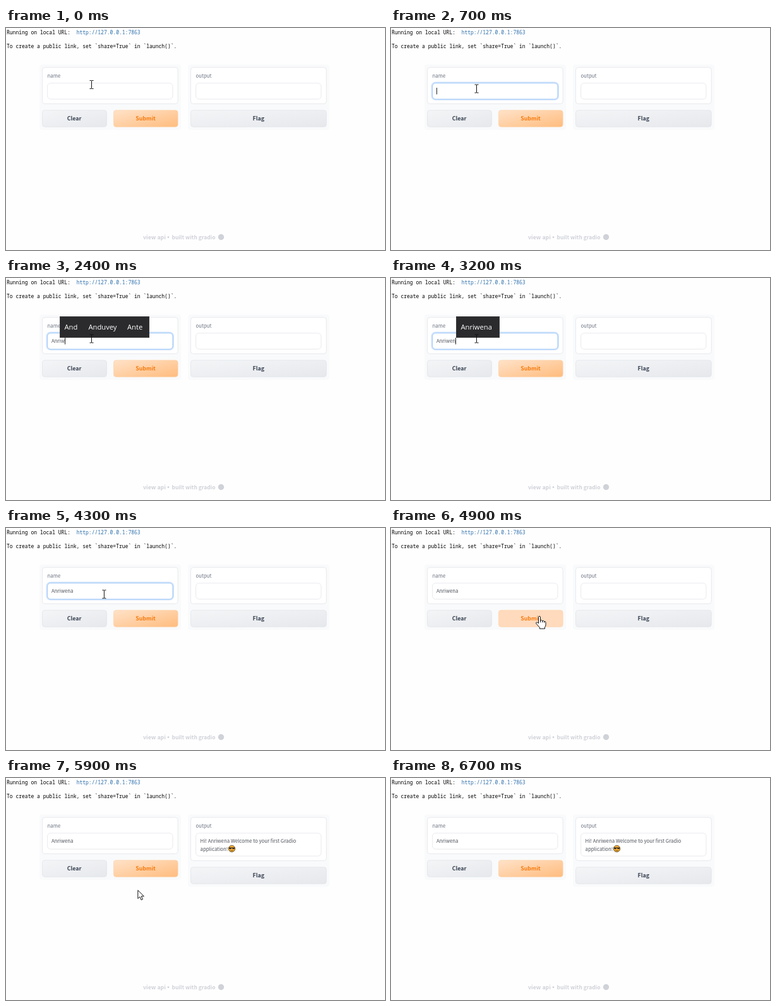
An HTML page for the animation above (7 s loop, 600x353 px).

```html
<!DOCTYPE html>
<html lang="en">
<head>
<meta charset="utf-8">
<title>Interface demo</title>
<style>
  html, body { margin: 0; width: 100%; height: 100%; overflow: hidden; background: #fffeff; }
  svg { display: block; width: 100%; height: 100%; }
  text { white-space: pre; }
  .mono { font: 8.02px "Noto Sans Mono", "DejaVu Sans Mono", monospace; }
  .ui { font: 7.84px "Noto Sans CJK JP", "Noto Sans CJK SC", "Noto Sans CJK", Lato, sans-serif; fill: #4f535b; }
  .label { fill: #6b7280; }
  .btn { font-size: 8.8px; font-weight: 700; text-anchor: middle; fill: #374151; }
  .foot { font-size: 8.8px; font-weight: 700; fill: #cfd2d8; }
  .tip { font: 11.2px "Open Sans", "Noto Sans", sans-serif; fill: #fff; }
  .panel { fill: #f9fafb; }
  .card, .field { fill: #fff; stroke: #e4e5ea; stroke-width: .8; }
  .key { fill: url(#grey); stroke: #e0e3e7; stroke-width: .7; }
</style>
</head>
<body>
<svg viewBox="0 0 600 353" xmlns="http://www.w3.org/2000/svg">
  <defs>
    <linearGradient id="grey" x1="0" y1="0" x2="1" y2="1">
      <stop stop-color="#f4f5f7"/><stop offset="1" stop-color="#e6e8ec"/>
    </linearGradient>
    <linearGradient id="warm" x1="0" y1="0" x2="1" y2="1">
      <stop stop-color="#ffe2c8"/><stop offset="1" stop-color="#ffbc7e"/>
    </linearGradient>
  </defs>

  <text class="mono" x="1" y="10">Running on local URL:  <tspan fill="#296eaa">http://127.0.0.1:7863</tspan></text>
  <text class="mono" x="1" y="31.5">To create a public link, set `share=True` in `launch()`.</text>

  <rect class="panel" x="53" y="58" width="224" height="104" rx="4"/>
  <rect class="card" x="57.5" y="62.7" width="214.7" height="57.8" rx="4"/>
  <text class="ui label" x="65.5" y="79">name</text>
  <rect id="ring" x="65" y="87" width="199.5" height="26.6" rx="5.5" fill="none" stroke="#cfe3fc" stroke-width="3"/>
  <rect id="field" class="field" x="65.6" y="87.7" width="198.3" height="25.4" rx="5"/>
  <text id="typed" class="ui" x="72" y="103.4"></text>
  <rect id="caret" y="95" width="1" height="10.5" fill="#222"/>
  <rect class="key" x="57.5" y="130.8" width="101.9" height="26.4" rx="4"/>
  <text class="ui btn" x="108" y="147.2">Clear</text>
  <rect id="submit" x="170.4" y="130.8" width="101.7" height="26.4" rx="4" stroke="#fdcfa2" stroke-width=".6"/>
  <text class="ui btn" x="221" y="147.2" style="fill:#f57c10">Submit</text>

  <rect id="panel" class="panel" x="288" y="58" width="224" rx="4"/>
  <rect id="card" class="card" x="292.5" y="62.7" width="214.7" rx="4"/>
  <text class="ui label" x="300.5" y="79">output</text>
  <rect id="out" class="field" x="300.6" y="87.7" width="198.3" rx="5"/>
  <g id="reply">
    <text class="ui" x="307.5" y="103.4">Hi! Anriwena Welcome to your first Gradio</text>
    <text class="ui" x="307.5" y="115.8">application!</text>
    <g transform="translate(357.5 112.4)">
      <circle r="5.2" fill="#f3ae35" stroke="#4a3418" stroke-width=".8"/>
      <path d="M-4.6 -2H4.6V-.9Q4.2 .7 2.5 .7T.5 -1H-.5Q-.8 .7 -2.5 .7T-4.6 -.9Z" fill="#2b2520"/>
      <path d="M-2.3 2.5Q0 3.9 2.3 2.5" fill="none" stroke="#5a3a14" stroke-width=".8"/>
    </g>
  </g>
  <g id="flag">
    <rect class="key" x="292.5" y="130.8" width="214.7" height="26.4" rx="4"/>
    <text class="ui btn" x="399.8" y="147.2">Flag</text>
  </g>

  <text class="ui foot" x="217" y="335.5">view api</text>
  <circle cx="257" cy="332.7" r="1.4" fill="#cfd2d8"/>
  <text class="ui foot" x="262.5" y="335.5" style="font-size:8.45px">built with gradio</text>
  <circle cx="340.5" cy="332.5" r="4.7" fill="#cfd2d8"/>

  <g id="popup">
    <rect id="box" x=".5" y="61.5" height="33" fill="#2b2a2c" stroke="#3c3b3d"/>
    <text class="tip" y="82.2"></text>
    <text class="tip" y="82.2"></text>
    <text class="tip" y="82.2"></text>
  </g>

  <g id="beam" fill="none" stroke="#111">
    <path d="M-3 -6.5h2.2q.8 0 .8.8v11.4q0 .8-.8.8H-3M3 -6.5H.8q-.8 0-.8.8M0 5.7q0 .8.8.8H3"/>
  </g>
  <path id="arrow" d="M0 0V13.2L3.1 10.4L5.3 15.4L7.6 14.4L5.4 9.5H9.6Z" fill="#fff" stroke="#111"/>
  <g id="hand" fill="#fff" stroke="#111" stroke-linejoin="round">
    <path d="M-1.5 1.2Q-1.5 -.3 0 -.3T1.5 1.2V6.3Q4 5.2 4.5 7Q7 6.1 7.4 8Q10 7.4 10 9.7V13.2Q10 15.6 8.5 17V19.5H.3V17.6L-5 11.6Q-6 10 -4.6 9.3Q-3.4 8.9 -1.5 11Z"/>
    <path d="M1.5 6.3V9.5M4.5 7V9.7M7.4 8V10" fill="none"/>
  </g>
</svg>
<script>
const LOOP = 7000, STEP = 100, NAME = "Anriwena";
const $ = id => document.getElementById(id);
const set = (id, attrs) => { for (const k in attrs) $(id).setAttribute(k, attrs[k]); };
const show = (id, on) => set(id, { display: on ? "inline" : "none" });

// time at which each letter is typed
const keys = [1300, 1600, 1900, 2200, 2400, 2900, 3000, 3300];

// start, left, width, then word and offset pairs
const popups = [
  [1500, 76, 110, "And", 7.5, "Any", 44, "As", 85],
  [2100, 85, 142, "And", 7.5, "Anduvey", 45.5, "Ante", 107],
  [2600, 94, 203, "Anriwena", 7.5, "Another", 76, "Answer", 142],
  [3200, 103, 69, "Anriwena", 7.5],
  [3500, 0, 0]
];

// time, x, y of the pointer
const path = [
  [0, 135.5, 90], [500, 135.5, 95.5], [600, 135.5, 95.5], [700, 135.5, 96.5],
  [4200, 135.5, 96.5], [4700, 235, 140.6], [5100, 235, 140.6],
  [5300, 255, 140], [5600, 255, 140], [5900, 208.8, 178.5],
  [6400, 116.5, 294], [6600, 42.5, 337], [6700, 0, 370], [LOOP, 0, 370]
];

function pointerAt(t) {
  const i = path.findIndex(p => p[0] > t);
  const [t0, x0, y0] = path[i - 1], [t1, x1, y1] = path[i];
  const k = (t - t0) / (t1 - t0);
  return [x0 + (x1 - x0) * k, y0 + (y1 - y0) * k];
}

function drawPointer(t) {
  const [x, y] = pointerAt(t);
  const within = (l, top, r, b) => x > l && x < r && y > top && y < b;
  const kind = within(65, 87, 265, 114) ? "beam" : within(170, 130, 273, 158) ? "hand" : "arrow";
  for (const id of ["beam", "hand", "arrow"]) show(id, id === kind && t < 6700);
  set(kind, { transform: `translate(${x} ${y})` });
  set("submit", { fill: kind === "hand" ? "#ffdabc" : "url(#warm)" });
}

function drawInput(t) {
  const focused = t >= 700 && t < 4800;
  const count = keys.filter(k => k <= t).length;
  const typed = $("typed");
  typed.textContent = NAME.slice(0, count);
  const end = count ? typed.getComputedTextLength() : 0;
  const blink = (t >= 1200 && t < 1300) || (t >= 3900 && t < 4400);
  show("ring", focused);
  $("field").style.stroke = focused ? "#93c1f5" : "";
  show("caret", focused && !blink);
  set("caret", { x: Math.round(72.3 + end) });
}

function drawPopup(t) {
  const open = popups.filter(p => p[0] <= t).pop();
  const visible = !!open && open[2] > 0;
  show("popup", visible);
  if (!visible) return;
  const [, left, width, ...words] = open;
  set("popup", { transform: `translate(${left} 0)` });
  set("box", { width: width - 1 });
  $("popup").querySelectorAll("text").forEach((el, i) => {
    el.textContent = words[2 * i] || "";
    el.setAttribute("x", words[2 * i + 1] || 0);
  });
}

function drawOutput(t) {
  const done = t >= 5000, grow = done ? 11 : 0;
  show("reply", done);
  set("panel", { height: 104 + grow });
  set("card", { height: 57.8 + grow });
  set("out", { height: 25.4 + grow });
  set("flag", { transform: `translate(0 ${grow})` });
}

function draw(ms) {
  const t = Math.floor((ms % LOOP) / STEP) * STEP;
  drawInput(t);
  drawPopup(t);
  drawOutput(t);
  drawPointer(t);
}

const start = performance.now();
function tick() {
  draw(performance.now() - start);
  requestAnimationFrame(tick);
}
tick();
</script>
</body>
</html>
```
